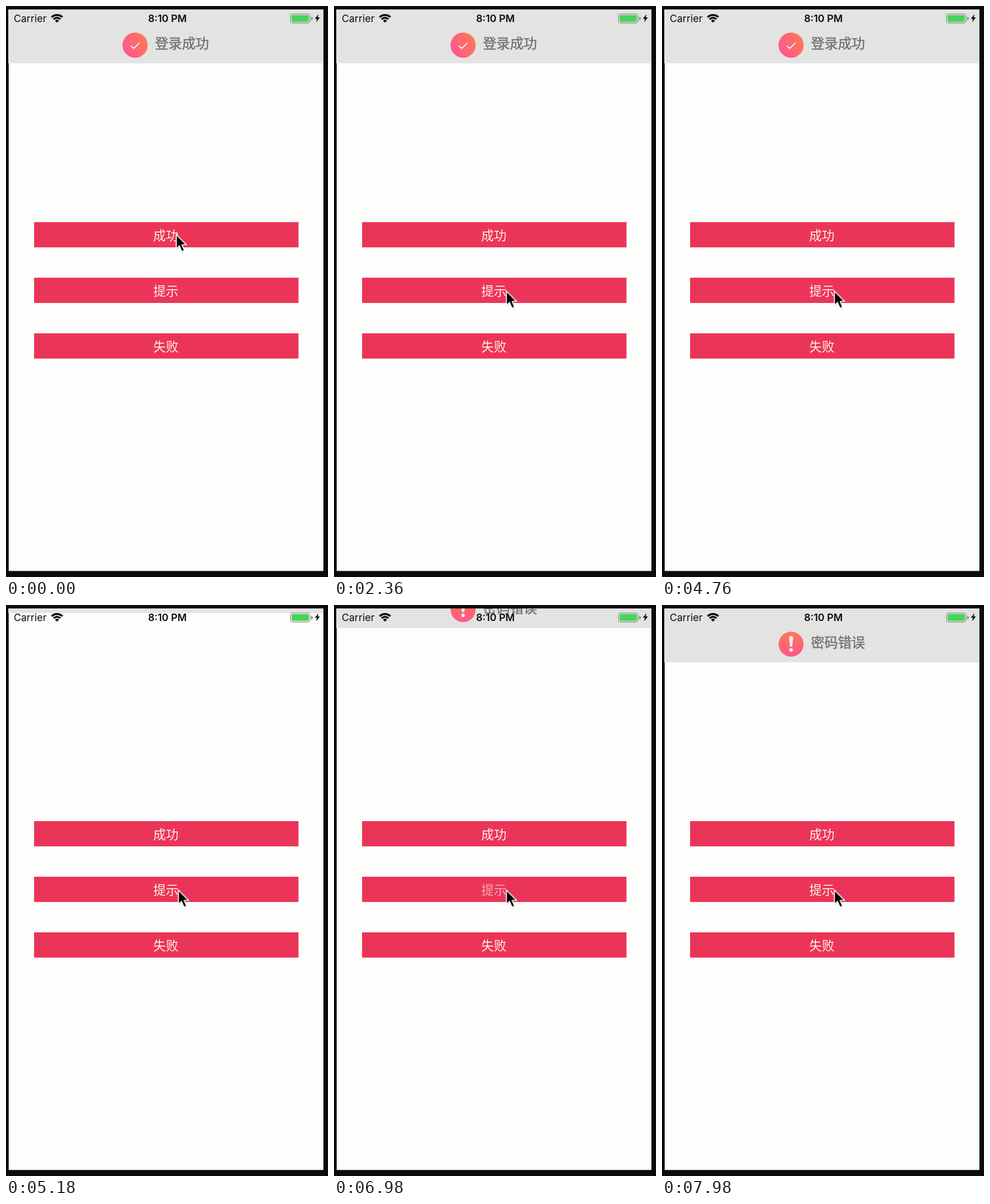
An HTML page for the animation above (8 s loop, 562 px wide and 996 px high).

```html
<!DOCTYPE html>
<html lang="zh-CN">
<head>
<meta charset="utf-8">
<title>Login notice</title>
<style>
  html, body { margin: 0; width: 100%; height: 100%; overflow: hidden; background: #0b0b0d; }
  svg { display: block; width: 100vw; height: 100vh; }
  text { font-family: "Noto Sans CJK SC", "Noto Sans CJK", sans-serif; }

  .status text { font: 400 17.5px Inter, Roboto, sans-serif; fill: #0b0b0d; }
  .status .clock { font-weight: 600; text-anchor: middle; }
  .button rect { fill: #eb3558; }
  .button text { font-size: 22px; fill: #fff1e6; text-anchor: middle; }
  .banner rect { fill: #e3e3e2; }
  .banner text { font-size: 23.6px; fill: #747476; stroke: #747476; stroke-width: .5px; }

  .success, .failure, .pressed, .pointer { animation: 8s linear infinite; }
  .success { animation-name: slide-out; }
  .failure { animation-name: slide-in; }
  .pressed { animation-name: press; }
  .pointer { animation-name: travel; }

  @keyframes slide-out {
    0%, 61.79% { transform: translateY(0); animation-timing-function: ease-in-out; }
    65.54%, 100% { transform: translateY(-94px); }
  }
  @keyframes slide-in {
    0%, 85.7% { transform: translateY(-94px); animation-timing-function: ease-in-out; }
    89.45%, 100% { transform: translateY(0); }
  }
  @keyframes press {
    0%, 84.3% { opacity: 1; }
    84.31%, 85.6% { opacity: .2; }
    88.8%, 100% { opacity: 1; }
  }
  @keyframes travel {
    0%, 4% { transform: translate(296px, 397px); animation-timing-function: ease-in-out; }
    10.25% { transform: translate(301px, 469.3px); animation-timing-function: ease-in-out; }
    14.5% { transform: translate(307px, 491px); animation-timing-function: ease-in-out; }
    18%, 100% { transform: translate(299.7px, 495.6px); }
  }
</style>
</head>
<body>
<svg viewBox="0 0 562 996" preserveAspectRatio="none">
  <defs>
    <clipPath id="screen"><rect x="4.7" y="6.4" width="549.3" height="979.2"/></clipPath>
    <linearGradient id="diagonal" x1="0" y1=".75" x2="1" y2=".25">
      <stop offset="0" stop-color="#ff5793"/><stop offset="1" stop-color="#ff7853"/>
    </linearGradient>
    <linearGradient id="vertical" x1="0" y1="0" x2="0" y2="1">
      <stop offset="0" stop-color="#ff7759"/><stop offset="1" stop-color="#ff5787"/>
    </linearGradient>
  </defs>

  <rect width="562" height="996" fill="#0b0b0d"/>
  <g clip-path="url(#screen)">
    <rect width="562" height="996" fill="#fdfdfb"/>

    <g class="button">
      <rect x="49" y="377" width="461.5" height="44"/>
      <text x="279" y="407.5">成功</text>
    </g>
    <g class="button">
      <rect x="49" y="474" width="461.5" height="44"/>
      <text class="pressed" x="279" y="504.5">提示</text>
    </g>
    <g class="button">
      <rect x="49" y="571" width="461.5" height="44"/>
      <text x="279" y="601.5">失败</text>
    </g>

    <g class="banner success">
      <rect y="6" width="562" height="94"/>
      <circle cx="225.3" cy="68.3" r="22" fill="url(#diagonal)"/>
      <path d="M218 69.3l5 4.7 10-9.7" fill="none" stroke="#fff3ee" stroke-width="1.8"/>
      <text x="260" y="74">登录成功</text>
    </g>
    <g class="banner failure">
      <rect y="6" width="562" height="94"/>
      <circle cx="225.3" cy="68.3" r="21.8" fill="url(#vertical)"/>
      <path d="M221.8 57.5a3.5 3.5 0 0 1 7 0l-1.2 13a2.3 2.3 0 0 1-4.6 0z" fill="#ffeeeb"/>
      <circle cx="225.3" cy="78.3" r="3.1" fill="#ffeeeb"/>
      <text x="260" y="74">密码错误</text>
    </g>

    <g class="status">
      <text x="13.5" y="28">Carrier</text>
      <g transform="translate(89 29)" fill="none" stroke="#0b0b0d">
        <path d="M-9.4-9.4a13.3 13.3 0 0 1 18.8 0" stroke-width="3.4"/>
        <path d="M-5.9-5.9a8.3 8.3 0 0 1 11.8 0" stroke-width="3.2"/>
        <path d="M0 0l-3.5-3.5a5 5 0 0 1 7 0z" fill="#0b0b0d" stroke="none"/>
      </g>
      <text class="clock" x="281.7" y="28">8:10 PM</text>
      <rect x="496.6" y="14.1" width="34" height="15.6" rx="3.8" fill="none" stroke="#8d8d8f" stroke-width="1.3"/>
      <rect x="498.6" y="16.1" width="30" height="11.6" rx="2" fill="#46d45c"/>
      <path d="M532.5 19a3 3 0 0 1 0 6z" fill="#8d8d8f"/>
      <path d="M545.3 14.2l-6.3 8h3.7l-1.2 6 6.3-8.2h-3.7z" fill="#0b0b0d"/>
    </g>
  </g>

  <g class="pointer">
    <path d="M1 3.5V29l6-5 4.5 9.5 5-2-4-9.5 8-.5z" fill="#000" opacity=".16"/>
    <path d="M2 3.8V24.5l4.8-4.4 4.5 10.2 3-1.3-4.3-10 6.7-.4z"
      fill="#000" stroke="#fff" stroke-width="3.4" paint-order="stroke"/>
  </g>
</svg>
</body>
</html>
```
